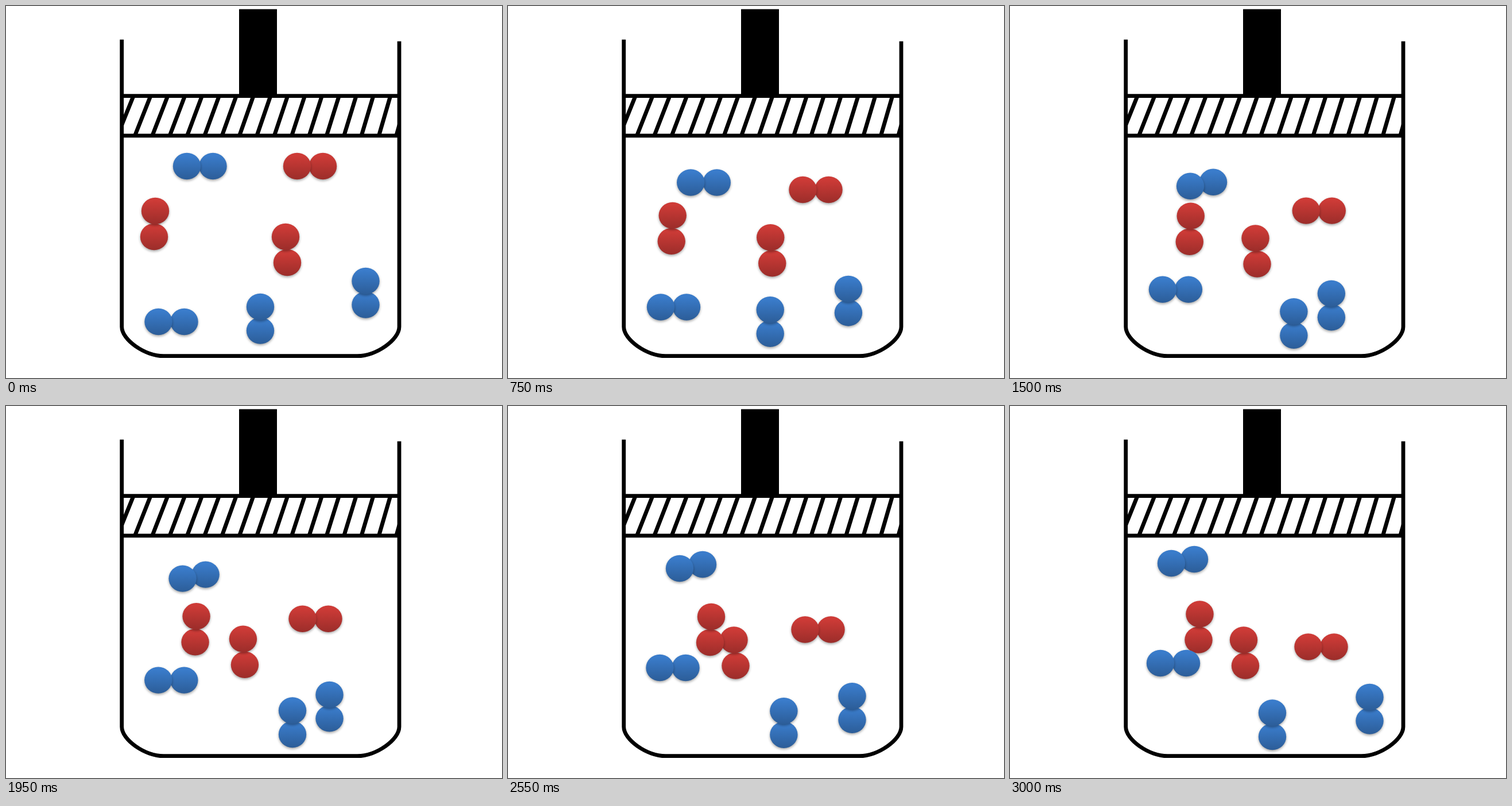
An HTML page with a canvas that plays this animation: 864x648 px, repeating every 3150 ms.

```html
<!DOCTYPE html>
<html lang="en">
<head>
<meta charset="utf-8">
<title>Gas molecules under a piston</title>
<style>
  html, body { margin: 0; width: 100%; height: 100%; overflow: hidden; background: #fff; }
  canvas { display: block; }
</style>
</head>
<body>
<canvas id="stage" width="864" height="648"></canvas>
<script>
const ctx = document.getElementById('stage').getContext('2d');
const STEP_MS = 150, STEPS = 21;
const RX = 24.2, RY = 23.2;
const BLUE = ['#3a7ccb', '#2c5d98'];
const RED = ['#ce3b37', '#9b2d2a'];

// Each molecule drifts in straight legs between collisions, given as [step, x, y].
// bond is the offset of the second atom, which lies beneath the first.
const molecules = [
  { colors: RED, bond: [45, 0],
    legs: [[0, 507, 279], [3, 512, 297.5], [7, 515, 342.5], [17, 517.5, 389.5], [20, 519.5, 419.5]] },
  { colors: RED, bond: [3, 45],
    legs: [[0, 487, 402], [10, 427.5, 404.5], [17, 393.5, 407.5], [20, 407, 407.5]] },
  { colors: RED, bond: [-2, 45],
    legs: [[0, 260, 357], [3, 275.5, 364.5], [17, 354, 367], [20, 330.5, 362.5]] },
  { colors: BLUE, bond: [45.5, 0], tilt: { step: 8, bond: [40, -7] },
    legs: [[0, 315, 279], [3, 316, 288], [7, 320.5, 327], [17, 299, 283], [20, 281, 274]] },
  { colors: BLUE, bond: [45, 0],
    legs: [[0, 265.5, 550], [3, 265.5, 539], [7, 266.5, 510], [17, 264.5, 456], [20, 262, 448]] },
  { colors: BLUE, bond: [0, 41.5],
    legs: [[0, 443, 524], [3, 442, 525.5], [7, 471.5, 533], [11, 502, 532], [15, 496, 529], [20, 457, 534.5]] },
  { colors: BLUE, bond: [0, 41.5],
    legs: [[0, 626.5, 479], [7, 579.5, 498.5], [11.5, 550, 502], [20, 626.5, 507]] }
];

function positionAt(legs, step) {
  const next = Math.max(1, legs.findIndex(([s]) => s >= step));
  const [s0, x0, y0] = legs[next - 1];
  const [s1, x1, y1] = legs[next];
  const k = (step - s0) / (s1 - s0);
  return [x0 + (x1 - x0) * k, y0 + (y1 - y0) * k];
}

function drawAtom(x, y, [light, dark]) {
  const fill = ctx.createLinearGradient(0, y - RY, 0, y + RY);
  fill.addColorStop(0.1, light);
  fill.addColorStop(1, dark);
  ctx.save();
  ctx.shadowColor = 'rgba(0, 0, 0, 0.35)';
  ctx.shadowBlur = 4;
  ctx.shadowOffsetY = 2.2;
  ctx.fillStyle = fill;
  ctx.beginPath();
  ctx.ellipse(x, y, RX, RY, 0, 0, Math.PI * 2);
  ctx.fill();
  ctx.restore();
}

function drawMolecule({ colors, bond, tilt, legs }, step) {
  const [x, y] = positionAt(legs, step);
  const [dx, dy] = tilt && step >= tilt.step ? tilt.bond : bond;
  drawAtom(x + dx, y + dy, colors);
  drawAtom(x, y, colors);
}

function strokeLine(x1, y1, x2, y2) {
  ctx.beginPath();
  ctx.moveTo(x1, y1);
  ctx.lineTo(x2, y2);
  ctx.stroke();
}

function drawVessel() {
  const left = 201.7, right = 685, bottom = 609.7, cornerW = 73, cornerH = 51;
  const round = 0.55; // how far the corner's handles stay from the square corner
  ctx.lineWidth = 6.8;
  ctx.beginPath();
  ctx.moveTo(left, 58.5);
  ctx.lineTo(left, bottom - cornerH);
  ctx.bezierCurveTo(left, bottom - cornerH * round, left + cornerW * round, bottom, left + cornerW, bottom);
  ctx.lineTo(right - cornerW, bottom);
  ctx.bezierCurveTo(right - cornerW * round, bottom, right, bottom - cornerH * round, right, bottom - cornerH);
  ctx.lineTo(right, 61.5);
  ctx.stroke();
}

function drawPiston() {
  ctx.fillRect(406, 5.5, 66, 151);
  strokeLine(203, 156.7, 684, 156.7);
  strokeLine(203, 225.8, 684, 225.8);
  ctx.save();
  ctx.beginPath();
  ctx.rect(204, 157, 479, 69);
  ctx.clip();
  ctx.lineWidth = 7;
  for (let i = 0; i < 17; i++) {
    const top = 221.5 + 29.85 * i;
    const lean = 27 - 0.5 * i;
    strokeLine(top, 158, top - lean, 225);
  }
  ctx.restore();
}

function render(time) {
  const step = Math.floor(time / STEP_MS) % STEPS;
  ctx.fillStyle = '#fff';
  ctx.fillRect(0, 0, 864, 648);
  ctx.strokeStyle = ctx.fillStyle = '#000';
  drawVessel();
  drawPiston();
  molecules.forEach(molecule => drawMolecule(molecule, step));
}

const startTime = performance.now();
function tick() {
  render(performance.now() - startTime);
  requestAnimationFrame(tick);
}
tick();
</script>
</body>
</html>
```
